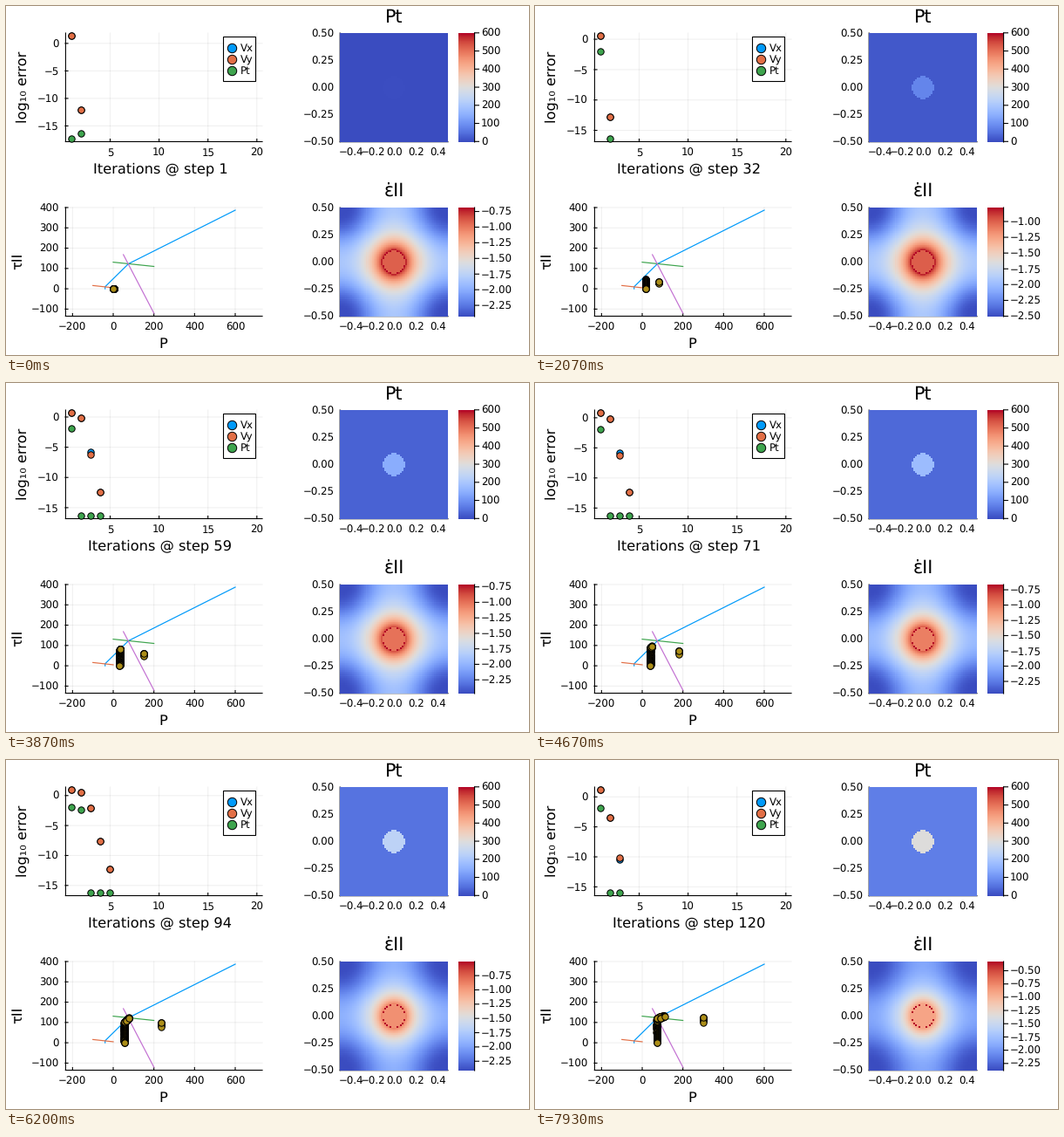
A matplotlib script for the animation above (8000 ms loop, 600 px wide and 400 px high).

```python
import numpy as np
import matplotlib.pyplot as plt
from matplotlib.animation import FuncAnimation
from matplotlib.patches import Rectangle

W, H, DPI = 600, 400, 100
FRAMES, LOOP = 160, 8000
PX = 72 / DPI
BLUE, RED, GREEN, PURPLE, GOLD = "#009AFA", "#E26F46", "#3EA44E", "#C371D2", "#AC8E18"
ONSET = 56  # first step with plastic yielding

plt.rcParams.update({"font.family": "DejaVu Sans", "path.snap": False,
                     "text.hinting": "none"})
fig = plt.figure(figsize=(W / DPI, H / DPI), dpi=DPI, facecolor="white")
ax = fig.add_axes([0, 0, 1, 1])
ax.axis("off")


def label(x, y, s, size=11.8, ha="center", rot=0):
    return ax.text(x, y, s, fontsize=size * PX, ha=ha, va="baseline",
                   rotation=rot, rotation_mode="anchor")


def line(xs, ys, color="black", lw=1.1, **kw):
    return ax.plot(xs, ys, color=color, lw=lw * PX, **kw)[0]


def grid(xs, ys):
    return line(xs, ys, alpha=0.06, zorder=0)


def dots(color, size=7.4, z=5):
    return ax.plot([], [], "o", ms=size * PX, mfc=color, mec="black",
                   mew=1.0 * PX, zorder=z)[0]


def num(v, digits=0):
    return f"{v:.{digits}f}".replace("-", "\u2212")


def frame(left, top, right, bottom):
    line([left, left], [top, bottom], zorder=1)
    line([left, right], [bottom, bottom], zorder=1)


def x_tick(x, text, top=None, bottom=0):
    if top is not None:
        grid([x, x], [top, bottom])
        line([x, x], [bottom - 3, bottom], zorder=1)
    label(x, bottom + 16, text)


def lerp(s, steps, values):
    return float(np.interp(s, steps, values))


# ---- residual plot ----
def it_x(i):
    return 68.2 + (i - 0.43) * 226 / 20.14


frame(68.4, 31, 294, 155.5)
for i in (5, 10, 15, 20):
    x_tick(it_x(i), str(i), 31, 155.5)
err_ticks = []
for v in (0, -5, -10, -15):
    err_ticks.append((v, grid([68, 294], [0, 0]),
                      line([68, 71], [0, 0], zorder=1),
                      label(60.7, 0, num(v), ha="right")))
step_label = label(177, 192, "", 16.2)
label(23.5, 93, "log₁₀ error", 16.2, rot=90)
err_dots = [dots(c) for c in (BLUE, RED, GREEN)]

ax.add_patch(Rectangle((249.5, 35.5), 37, 51, fc="white", ec="black",
                       lw=1.1 * PX, zorder=7))
for y, c, name in ((47.7, BLUE, "Vx"), (60.9, RED, "Vy"), (74, GREEN, "Pt")):
    dots(c, 10.4, 8).set_data([259.4], [y])
    label(269, y + 4.3, name, ha="left").set_zorder(8)


def residuals(s):
    """Residuals (Vx, Vy, Pt) per iteration at step s."""
    v0 = lerp(s, [2, 48, 71, 84, 106, 120], [.53, .55, .8, .8, 1.1, 1.15])
    p0 = lerp(s, [2, 48, 71, 106, 120], [-1.95, -1.93, -1.9, -1.85, -1.8])
    low = lerp(s, [2, 48, 71, 106, 120], [-16.4, -16.4, -16.3, -16.2, -16.0])
    if s == 1:
        return [1.35, -12], [1.35, -12], [-17.35, -16.3]
    if s < ONSET:
        end = lerp(s, [2, 32, 48], [-12.8, -12.7, -12.6])
        vx, vy, pt = [v0, end], [v0, end], [p0, low]
    elif s < 76:
        vx = [v0, -.1, -5.75, -12.4]
        vy = [v0, -.2, -6.25, -12.4]
        pt = [p0, low, low, low]
    elif s < 95:
        vx = [v0, .6, -2.1, -7.55, -12.3]
        vy = [v0, .5, -2.1, -7.65, -12.3]
        pt = [p0, -2.4, low, low, low]
    elif s < 113:
        vx = vy = [v0, .75, -4.4, -12.2]
        pt = [p0, -2.5, low, low]
    else:
        vx = [v0, -3.4, -10.4]
        vy = [v0, -3.5, -10.2]
        pt = [p0, low, low]
    return vx, vy, pt


def draw_residuals(s):
    series = residuals(s)
    hi, lo = max(map(max, series)), min(map(min, series))
    pad = 0.03 * (hi - lo)

    def to_y(v):
        return 30.8 + (hi + pad - np.asarray(v)) * 125 / (hi - lo + 2 * pad)

    for d, vals in zip(err_dots, series):
        d.set_data(it_x(np.arange(1, len(vals) + 1)), to_y(vals))
    for v, rule, tick, text in err_ticks:
        y = float(to_y(v))
        rule.set_ydata([y, y])
        tick.set_ydata([y, y])
        text.set_y(y + 4.5)
    step_label.set_text(f"Iterations @ step {s}")


# ---- stress plot ----
def p_x(p):
    return 123 + np.asarray(p) * 0.2333


def tau_y(t):
    return 324.1 - np.asarray(t) * 0.2328


frame(68.4, 231, 294, 355.5)
for p in range(-200, 601, 200):
    x_tick(float(p_x(p)), num(p), 231, 355.5)
for t in range(-100, 401, 100):
    y = float(tau_y(t))
    grid([68, 294], [y, y])
    line([68, 71], [y, y], zorder=1)
    label(60.7, y + 4.5, num(t), ha="right")
label(180, 392, "P", 16.2)
label(18, 292, "τII", 16.2, rot=90)
for c, ps, ts in ((BLUE, [-40, -40, 75, 600], [0, 10, 123, 387]),
                  (RED, [-100, 0], [16, 5]),
                  (GREEN, [0, 200], [131, 110]),
                  (PURPLE, [50, 200], [168, -120])):
    line(p_x(ps), tau_y(ts), c, 1.2, zorder=3)
stress_dots = dots(GOLD)


def matrix_p(s):
    return lerp(s, [1, 32, 48, 71, 84, 106, 120], [.6, 17, 25, 40, 48, 62, 72])


def yield_tau(p):
    return np.interp(p, [-40, 75, 600], [10, 123, 387])


def stress_points(s):
    rng = np.random.default_rng(7)
    pm = matrix_p(s)
    top = min(1.45 * s, float(yield_tau(pm)))
    col_t = np.linspace(top, 0, 90)
    col_p = pm + rng.uniform(-1.5, 1.5, 90)
    inc_t = np.append(np.linspace(1.05, .9, 12), [.82, 1.05]) * s
    inc_p = np.full(len(inc_t), 2.5 * s + .5)
    if s < ONSET:
        return np.r_[inc_p, col_p], np.r_[inc_t, col_t]
    u = np.append(rng.uniform(0, 1, 59), 1)
    cloud_p = pm + .58 * (s - 55) * u
    drop = rng.uniform(0, 1, 60) * .2 * (s - 55)
    cloud_t = np.minimum(yield_tau(cloud_p), 133) - drop * (1 - .6 * u)
    return np.r_[inc_p, col_p, cloud_p], np.r_[inc_t, col_t, cloud_t]


# ---- field maps ----
N = 61
c = (np.arange(N) + .5) / N - .5
X, Y = np.meshgrid(c, c)
Z = X + 1j * Y
inside = np.hypot(X, Y) < .1
touching = sum(np.roll(inside, k, a).astype(int) for a in (0, 1) for k in (-1, 1))
rim = ~inside & (touching > 0)
corners = ~inside & (touching > 1)
# point source mirrored in the box walls; the offset avoids its pole
pull = sum(1 / (Z - a - 1j * b + 1e-9) ** 2
           for a in range(-3, 4) for b in range(-3, 4))
decay = np.abs(pull) * .105 ** 2


def field(top, title, vmin, vmax):
    frame(383.2, top, 507, top + 124.7)
    for v in (-.4, -.2, 0, .2, .4):
        x_tick(445.5 + v * 124.5, num(v, 1), bottom=top + 124.7)
    for v in (.5, .25, 0, -.25, -.5):
        label(376.3, top + 62.3 - v * 124.7 + 4.5, num(v, 2), ha="right")
    label(445, top - 12.4, title, 20.6)
    style = dict(cmap="coolwarm", aspect="auto", zorder=2)
    img = ax.imshow(np.zeros((N, N)), extent=(383, 507, top + 125, top),
                    vmin=vmin, vmax=vmax, interpolation="nearest", **style)
    ax.imshow(np.linspace(1, 0, 250)[:, None],
              extent=(519, 538, top + 125, top), **style)
    line([537.6, 537.6], [top, top + 125], zorder=3)
    return img


def bar_tick(y, text):
    return (line([537.6, 542.5], [y, y], zorder=3),
            label(545, y + 4.4, text, ha="left"))


pt_img = field(31, "Pt", 0, 600)
for v in range(0, 601, 100):
    bar_tick(155.3 - v * 124.5 / 600, str(v))
rate_img = field(231, "ε\u0307II", -2.4, -.7)
rate_ticks = [(v, *bar_tick(0, num(v, 2))) for v in np.arange(-.5, -2.6, -.25)]


def draw_fields(s):
    pt_img.set_data(np.where(inside, 2.5 * s, matrix_p(s)))

    hi = lerp(s, [1, 14, 32, 48, 71, 84, 106, 120],
              [-.687, -.77, -.779, -.756, -.664, -.658, -.318, -.327])
    lo = lerp(s, [1, 14, 32, 48, 71, 84, 106, 120],
              [-2.43, -2.498, -2.507, -2.494, -2.45, -2.435, -2.39, -2.385])
    edge = lerp(s, [1, 32, 71], [-.74, -.81, -.83])
    core = lerp(s, [1, 32, 71, 84, 106], [-.91, -.99, -1.0, -.97, -.9])
    rate = edge + .5 * np.log10(decay ** 2 + 10 ** (2 * (lo - edge)))
    rate[inside] = core
    if s < ONSET:
        rate[rim] = hi - .06
    rate[corners] = hi
    rate_img.set_data(rate)
    rate_img.set_clim(lo, hi)
    for v, tick, text in rate_ticks:
        y = 231 + (hi - v) * 125 / (hi - lo)
        show = lo <= v <= hi
        tick.set_ydata([y, y])
        text.set_y(y + 4.4)
        tick.set_visible(show)
        text.set_visible(show)


def draw(n):
    # three steps every four frames, the third held twice as long
    s = 3 * (n // 4) + min(n % 4, 2) + 1
    draw_residuals(s)
    p, t = stress_points(s)
    stress_dots.set_data(p_x(p), tau_y(t))
    draw_fields(s)
    return []


ax.set_xlim(0, W)
ax.set_ylim(H, 0)
anim = FuncAnimation(fig, draw, frames=FRAMES, interval=LOOP // FRAMES,
                     init_func=lambda: draw(0), repeat=True, repeat_delay=0)
plt.show()
```
